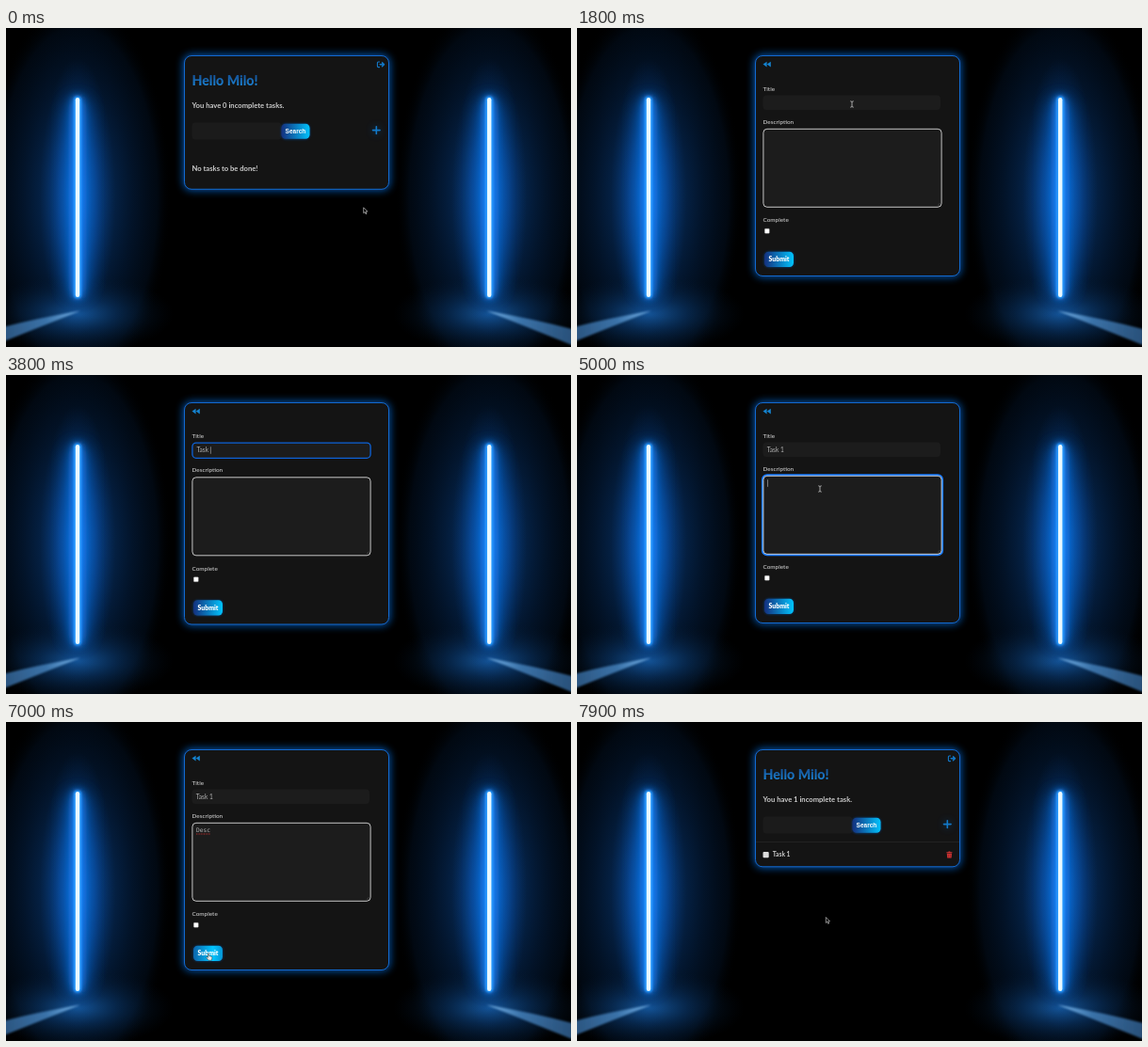
Recreate the animation shown at these times as an HTML page. Size 600 by 339 pixels, loop 8000 ms.

```html
<!DOCTYPE html>
<html lang="en">
<head>
<meta charset="utf-8">
<title>Task list</title>
<style>
  html, body { margin: 0; width: 100%; height: 100%; overflow: hidden; background: #000; }
  svg { display: block; width: 100%; height: 100%; }
  text { font-family: Lato, "Open Sans", sans-serif; fill: #cbcbcb; white-space: pre; }
  .big { font-size: 14.2px; font-weight: 800; fill: url(#heading); }
  .body { font-size: 7.65px; font-weight: 700; }
  .label { font-size: 6.4px; font-weight: 500; }
  .value { font-size: 6.6px; fill: #b4b4b4; }
  .mono { font-family: "DejaVu Sans Mono", monospace; font-size: 6.25px; fill: #b4b4b4; }
  .field { fill: #1c1c1c; }
  .icon { fill: none; stroke: #1279c9; stroke-linecap: round; stroke-linejoin: round; }
  .caret { fill: #b8b8b8; }
  .pointer { fill: #000; stroke: #c4c4c4; stroke-width: .7; stroke-linejoin: round; }
  #hand { fill: #e8e8e8; stroke: #111; stroke-width: .4; }
</style>
</head>
<body>
<svg viewBox="0 0 600 339">
  <defs>
    <radialGradient id="haze">
      <stop offset="0" stop-color="#0b4a98" stop-opacity=".8"/>
      <stop offset=".3" stop-color="#083a78" stop-opacity=".68"/>
      <stop offset=".6" stop-color="#052650" stop-opacity=".5"/>
      <stop offset=".85" stop-color="#03152c" stop-opacity=".4"/>
      <stop offset="1" stop-color="#000" stop-opacity="0"/>
    </radialGradient>
    <radialGradient id="halo">
      <stop offset="0" stop-color="#1478ea" stop-opacity=".85"/>
      <stop offset=".5" stop-color="#0c58b8" stop-opacity=".5"/>
      <stop offset="1" stop-color="#063878" stop-opacity="0"/>
    </radialGradient>
    <radialGradient id="floor">
      <stop offset="0" stop-color="#1a66b4" stop-opacity=".8"/>
      <stop offset=".4" stop-color="#0c3f78" stop-opacity=".5"/>
      <stop offset="1" stop-color="#04162c" stop-opacity="0"/>
    </radialGradient>
    <linearGradient id="beam" x1="1" x2="0">
      <stop offset="0" stop-color="#8cc4f4" stop-opacity=".85"/>
      <stop offset=".4" stop-color="#4c8cc8" stop-opacity=".75"/>
      <stop offset="1" stop-color="#3a74b0" stop-opacity=".7"/>
    </linearGradient>
    <linearGradient id="heading" x2="0" y2="1">
      <stop offset=".15" stop-color="#144f94"/>
      <stop offset=".8" stop-color="#1b7fd0"/>
    </linearGradient>
    <linearGradient id="search" gradientUnits="userSpaceOnUse" x1="292.5" x2="352.5">
      <stop offset="0" stop-color="#14307e"/>
      <stop offset=".51" stop-color="#00c6ff"/>
      <stop offset="1" stop-color="#14307e"/>
    </linearGradient>
    <linearGradient id="submit" href="#search" gradientUnits="userSpaceOnUse" x1="199" x2="261"/>
    <filter id="soft1" x="-50%" y="-50%" width="200%" height="200%"><feGaussianBlur stdDeviation="1.1"/></filter>
    <filter id="soft4" filterUnits="userSpaceOnUse" x="-60" y="0" width="660" height="339"><feGaussianBlur stdDeviation="4"/></filter>
    <filter id="soft9" filterUnits="userSpaceOnUse" x="-60" y="0" width="660" height="339"><feGaussianBlur stdDeviation="9"/></filter>
    <g id="lamp">
      <ellipse cx="76" cy="178" rx="100" ry="210" fill="url(#haze)"/>
      <ellipse cx="76" cy="304" rx="102" ry="42" fill="url(#floor)"/>
      <ellipse cx="76" cy="180" rx="40" ry="148" fill="url(#halo)"/>
      <rect x="66" y="76" width="20" height="208" rx="10" fill="#0f6ad8" opacity=".7" filter="url(#soft9)"/>
      <rect x="70.5" y="72" width="11" height="216" rx="5.5" fill="#1a86ff" filter="url(#soft4)"/>
      <path d="M79 300.5 Q30 309 -12 320 V337Z" fill="url(#beam)" filter="url(#soft1)"/>
      <rect x="72" y="72.5" width="8" height="215" rx="4" fill="#2a9cff" filter="url(#soft1)"/>
      <rect x="73.8" y="74" width="4.4" height="212" rx="2.2" fill="#e9f8ff"/>
    </g>
  </defs>

  <rect width="600" height="339"/>
  <use href="#lamp"/>
  <use href="#lamp" transform="translate(589.2) scale(-1 1)"/>

  <rect id="glow" x="188" y="28" width="220" height="145" rx="9" fill="#0c64c8" opacity=".85" filter="url(#soft4)"/>
  <rect id="card" x="189.5" y="29.5" width="217" height="142" rx="7.5" fill="#141414" stroke="#106ad0"/>

  <g id="list">
    <g class="icon" stroke-width="1.1">
      <path d="M396.6 36h-1.2q-1 0-1 1v3.6q0 1 1 1h1.2"/>
      <path d="M397.2 38.8h4M399.5 36.9l2 1.9-2 1.9" stroke-width="1.5"/>
    </g>
    <text class="big" x="197.5" y="60.8">Hello Milo!</text>
    <text id="count" class="body" x="197.5" y="84.6"></text>
    <rect x="197.5" y="100.5" width="95" height="18" rx="3.5" fill="#1b1b1b"/>
    <rect x="292" y="101.5" width="31" height="17" rx="5" fill="#0b4c9c" opacity=".6" filter="url(#soft1)"/>
    <rect x="292.5" y="101.8" width="30" height="16" rx="4.5" fill="url(#search)"/>
    <text x="296.6" y="112.2" style="font:700 6.5px 'Liberation Sans',Arial,sans-serif;fill:#fff">Search</text>
    <path d="M393.3 105v7.4M389.6 108.7h7.4" stroke="#0c58a8" stroke-width="2.6" opacity=".6" filter="url(#soft4)"/>
    <path class="icon" d="M393.3 104.8v7.6M389.5 108.6h7.6" stroke-width="1.6"/>
    <text id="empty" class="body" x="197.5" y="151.6">No tasks to be done!</text>
    <g id="row">
      <path d="M190 127.5h216" stroke="#222"/>
      <rect x="197.5" y="138" width="6.2" height="6.2" rx="1" fill="#dedede"/>
      <text x="207.8" y="143.4" style="font-size:6.7px;font-weight:700">Task 1</text>
      <path d="M392.4 138.2h1.8l.5-.8h1.4l.5.8h1.8v1h-6zM392.8 139.8h5.2l-.4 4.8h-4.4z" fill="#cf3434"/>
      <path d="M394.4 140.7v3M396.4 140.7v3" stroke="#7a1c1c" stroke-width=".5"/>
    </g>
  </g>

  <g id="form">
    <path d="M201.6 35.8v5.6l-4.1-2.8zM205.8 35.8v5.6l-4.1-2.8z" fill="#1483d0"/>
    <text class="label" x="197.5" y="67.3">Title</text>
    <rect id="title" class="field" stroke="#0d62d8"/>
    <text id="titleText" class="value"></text>
    <g id="lower">
      <text class="label" x="197.5" y="101.9">Description</text>
      <rect id="ring" x="197" y="106.4" width="191" height="84.8" rx="4.8" fill="none" stroke="#1a7cff" stroke-width="2.2"/>
      <rect class="field" x="197.9" y="107.3" width="189.2" height="83" rx="4" stroke="#d8d8d8" stroke-width=".9"/>
      <path d="M383 188.6l2.6-2.6M384.8 188.6l.8-.8" stroke="#777" stroke-width=".4"/>
      <text id="descText" class="mono" x="202" y="117.4"></text>
      <path id="spell" d="M202 119h15" stroke="#d03030" stroke-width=".8" stroke-dasharray="1 .6"/>
      <text class="label" x="197.5" y="206.2">Complete</text>
      <rect x="199.3" y="213.2" width="5" height="5" rx=".8" fill="#fff" stroke="#8a8a8a" stroke-width=".4"/>
      <rect x="198.5" y="237.5" width="32" height="17" rx="5" fill="#0b4c9c" opacity=".6" filter="url(#soft1)"/>
      <rect x="199" y="237.8" width="31" height="16.2" rx="4.5" fill="url(#submit)"/>
      <text x="203.5" y="248.2" style="font-size:6.9px;font-weight:900;fill:#fff">Submit</text>
    </g>
    <rect id="caret" class="caret" width=".6" height="7.6"/>
  </g>

  <g id="cursor">
    <path id="arrow" class="pointer" d="M0 0v5.9l1.4-1.2 1 2.2 .9-.4-1-2.2h1.9z"/>
    <path id="beamCursor" d="M-1.7-3.2q1.7 0 1.7.9q0-.9 1.7-.9M0-2.4v4.8M-1.7 3.2q1.7 0 1.7-.9q0 .9 1.7.9" fill="none" stroke="#ccc" stroke-width=".8"/>
    <path id="hand" d="M-.6 0q.6-.7 1.2 0v2.6l2.6.6q.8.3.7 1.2l-.5 2.8h-3.4l-2.2-2.8q-.1-.9.8-.7l.8.7z"/>
  </g>
</svg>
<script>
const LOOP = 8000, STEP = 100;
const FORM_OPEN = 900, TITLE_FOCUS = 2000, DESC_FOCUS = 4800, DESC_BLUR = 7000, FORM_SENT = 7700;
const titleKeys = [2900, 3100, 3300, 3500, 3700, 4100];
const descKeys = [5500, 5700, 5800, 5900];

// time, x, y
const path = [
  [0, 379.7, 190.8], [100, 382, 178], [200, 382, 178], [700, 393, 108], [900, 393, 108],
  [1700, 292, 81], [4400, 292, 81], [4800, 258, 121], [6100, 258, 121],
  [6400, 246, 198.8], [6900, 215, 246], [7200, 215, 246], [7500, 227, 231.3], [7900, 264.3, 207.5]
];

const el = id => document.getElementById(id);
const show = (id, on) => el(id).style.display = on ? "" : "none";
const set = (id, attrs) => { for (const k in attrs) el(id).setAttribute(k, attrs[k]); };
const within = (v, a, b) => v >= a && v < b;
const typed = (word, keys, t) => word.slice(0, keys.filter(k => k <= t).length);
const smooth = p => p * p * (3 - 2 * p);

function position(t) {
  const i = path.findIndex(p => p[0] > t);
  if (i < 0) return path[path.length - 1].slice(1);
  const [t0, x0, y0] = path[i - 1], [t1, x1, y1] = path[i];
  const p = smooth((t - t0) / (t1 - t0));
  return [x0 + (x1 - x0) * p, y0 + (y1 - y0) * p];
}

function drawCursor(t, inForm) {
  const [x, y] = position(t);
  const overText = inForm && within(x, 198, 387) && (within(y, 72, 88) || within(y, 107, 191));
  const overLink = within(t, 600, FORM_OPEN) || within(t, 6800, 7300);
  set("cursor", { transform: `translate(${x} ${y})` });
  show("cursor", !within(t, titleKeys[0], 4500) && !within(t, descKeys[0], 6200));
  show("beamCursor", overText);
  show("hand", overLink && !overText);
  show("arrow", !overText && !overLink);
}

function drawCaret(t, inTitle, inDesc) {
  const events = [TITLE_FOCUS, ...titleKeys, DESC_FOCUS, ...descKeys];
  const last = Math.max(...events.filter(e => e <= t));
  show("caret", (inTitle || inDesc) && (t - last) % 1000 < 500);
  const id = inTitle ? "titleText" : "descText";
  const start = inTitle ? 202.4 : 202;
  set("caret", {
    x: start + el(id).getComputedTextLength() + .2,
    y: inTitle ? 76.2 : 111.2
  });
}

function draw(t) {
  const inForm = within(t, FORM_OPEN, FORM_SENT);
  const done = t >= FORM_SENT;
  const inTitle = within(t, TITLE_FOCUS, DESC_FOCUS);
  const inDesc = within(t, DESC_FOCUS, DESC_BLUR);
  const shift = inTitle ? 1.5 : 0;
  const height = inForm ? 234 + shift : done ? 124.3 : 141.8;

  set("card", { height });
  set("glow", { height: height + 3 });
  show("list", !inForm);
  show("form", inForm);
  show("empty", !done);
  show("row", done);
  el("count").textContent = done ? "You have 1 incomplete task." : "You have 0 incomplete tasks.";

  set("title", inTitle
    ? { x: 197.9, y: 72.1, width: 189.2, height: 16.2, rx: 4, "stroke-width": 1.3 }
    : { x: 197.5, y: 71.5, width: 188.5, height: 15.6, rx: 4, "stroke-width": 0 });
  set("titleText", { x: inTitle ? 202.4 : 201.7, y: inTitle ? 82.4 : 81.8 });
  el("titleText").textContent = typed("Task 1", titleKeys, t);
  el("descText").textContent = typed("Desc", descKeys, t);
  set("lower", { transform: `translate(0 ${shift})` });
  show("ring", inDesc);
  show("spell", t >= DESC_BLUR);

  const hover = smooth(Math.min(1, Math.max(0, (t - 6800) / 500)));
  set("submit", { x1: 199 - 31 * hover, x2: 261 - 31 * hover });

  drawCaret(t, inTitle, inDesc);
  drawCursor(t, inForm);
}

const begin = performance.now();
function tick() {
  const t = (performance.now() - begin) % LOOP;
  draw(Math.floor(t / STEP) * STEP);
  requestAnimationFrame(tick);
}
tick();
</script>
</body>
</html>
```
